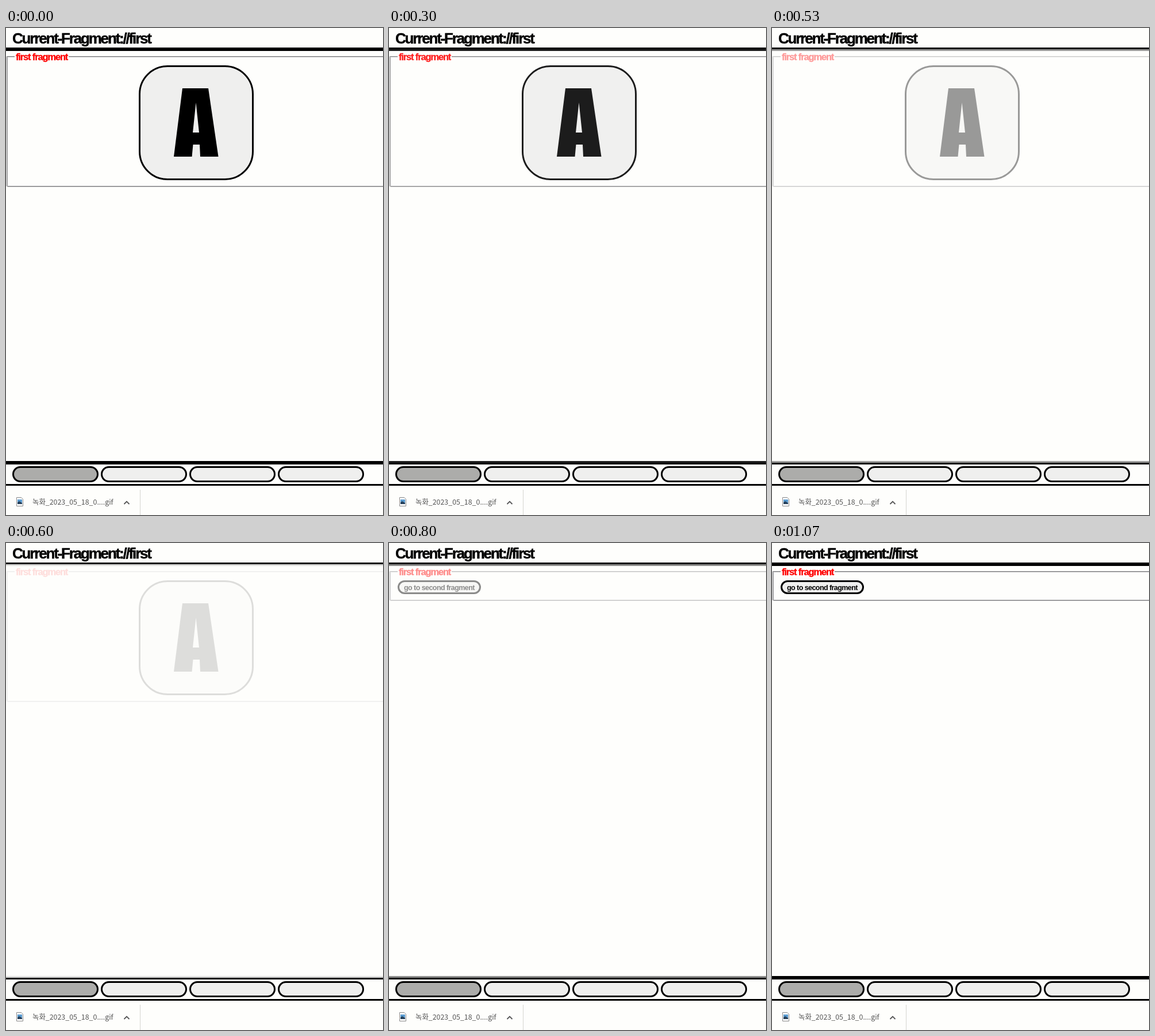
Write an HTML page that moves like this. It is 656 by 848 pixels and loops after 1.81 s.

```html
<!DOCTYPE html>
<html lang="en">
<head>
<meta charset="utf-8">
<title>Fragment switch</title>
<style>
  html, body { margin: 0; width: 100%; height: 100%; overflow: hidden; background: #fefefc; }
  svg { display: block; width: 100vw; height: 100vh; }
  .heavy { font-family: "Liberation Sans", Arial, sans-serif; font-weight: 700; }
  .title { font-size: 26px; letter-spacing: -.084em; stroke: #000; stroke-width: .4px; }
  .legend { font-size: 16.5px; letter-spacing: -.07em; fill: red; stroke: red; stroke-width: .3px; }
  .label { font-size: 12.5px; letter-spacing: -.045em; }
  .file { font: 12.4px "Noto Sans CJK KR", "Noto Sans", sans-serif; fill: #555; }
  .button { fill: #efefee; stroke: #000; stroke-width: 3px; }
  .frame { fill: none; stroke-width: 1px; }
</style>
</head>
<body>
<svg viewBox="0 0 656 848">
  <rect width="656" height="848" fill="#fefefc"/>
  <text class="heavy title" x="11" y="26.5">Current-Fragment://first</text>
  <path d="M0 34h656v3H0zM0 757h656v3H0zM0 794h656v3H0z"/>
  <g id="pills"></g>

  <g id="fragment">
    <path d="M0 37h656v3H0zM0 754h656v3H0z"/>
    <path id="dark" class="frame" stroke="#808084"/>
    <path id="light" class="frame" stroke="#b8b8b8"/>
    <text class="heavy legend" x="17" y="56">first fragment</text>
    <g id="before">
      <rect class="button" x="232.5" y="66.5" width="197" height="197" rx="48.5"/>
      <path role="img" aria-label="A" fill-rule="evenodd"
        d="M307 105H352L369.5 224H338L337 203H325.5L323.5 224H292ZM330.5 130L325 182H336Z"/>
    </g>
    <g id="after">
      <rect class="button" x="16.5" y="66.5" width="142" height="21" rx="10.5"/>
      <text class="heavy label" x="26" y="81.5">go to second fragment</text>
    </g>
  </g>

  <path d="M18.5 817.5h8l3 3v12h-11z" fill="#fff" stroke="#888"/>
  <path d="M20 821h8v8h-8z" fill="#5a9bd0"/>
  <path d="M20 829v-3l3-2 5 3v2z" fill="#26405a"/>
  <text class="file" x="46" y="830">녹화_2023_05_18_0....gif</text>
  <path d="M205.5 829l4.5-4.5 4.5 4.5" fill="none" stroke="#555" stroke-width="1.8"/>
  <path d="M233.5 804v44" stroke="#d4d4d0"/>
</svg>
<script>
const LOOP = 1810, OUT = 30, SWAP = 630, IN_END = 1070;
const $ = id => document.getElementById(id);
const progress = (t, from, to) => Math.min(1, Math.max(0, (t - from) / (to - from)));

$("pills").innerHTML = [0, 1, 2, 3].map(i =>
  `<rect class="button" x="${12.5 + 154 * i}" y="764.5" width="147" height="25" rx="12.5"
    ${i ? "" : 'style="fill:#acacaa"'}/>`).join("");

// Fieldset outline, open at the legend and running off the right edge
const outline = (x, top, bottom) => `M15 ${top}H${x}V${bottom}H656M109 ${top}H656`;

// Slow start on the way out, slow end on the way in
const opacityAt = t => t < SWAP
  ? 1 - progress(t, OUT, SWAP) ** 2.75
  : 1 - (1 - progress(t, SWAP, IN_END)) ** 1.2;

function draw(now) {
  const t = now % LOOP, swapped = t >= SWAP, bottom = swapped ? 100.5 : 276.5;
  $("fragment").setAttribute("opacity", opacityAt(t));
  $("before").style.display = swapped ? "none" : "";
  $("after").style.display = swapped ? "" : "none";
  $("dark").setAttribute("d", outline(1.5, 49.5, bottom - 1));
  $("light").setAttribute("d", outline(2.5, 50.5, bottom));
}

const start = performance.now();
function tick() {
  draw(performance.now() - start);
  requestAnimationFrame(tick);
}
tick();
</script>
</body>
</html>
```
